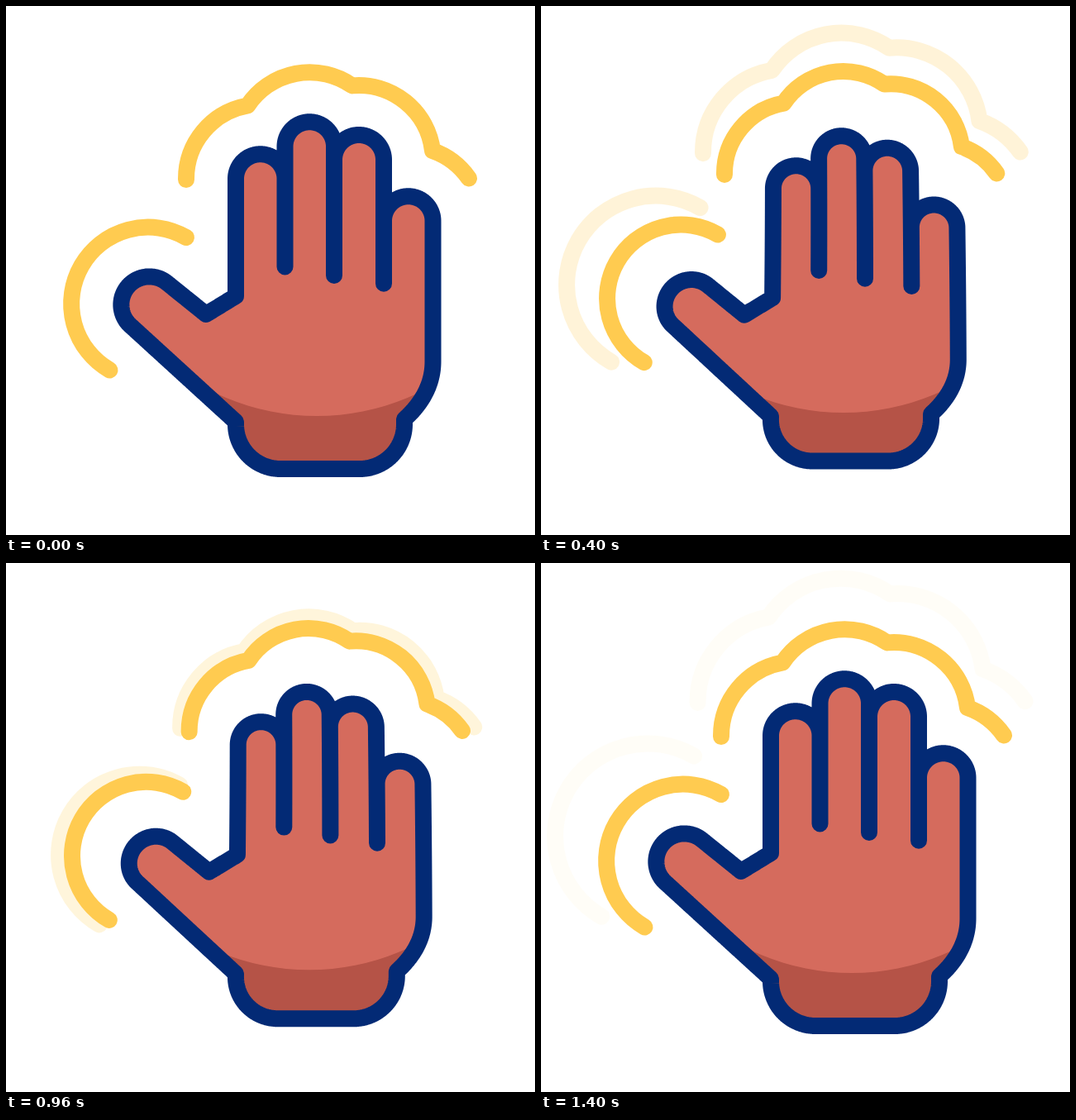
An HTML page for the animation above (1.48 s loop, 640 px wide and 640 px high).

```html
<!DOCTYPE html>
<html lang="en">
<head>
<meta charset="utf-8">
<title>Waving hand</title>
<style>
  html, body { margin: 0; width: 100%; height: 100%; overflow: hidden; background: #fff; }
  svg { display: block; width: 640px; height: 640px; }
  path { fill: none; stroke-width: 20; stroke-linecap: round; stroke-linejoin: round; }
  .halo { stroke: #ffcb50; vector-effect: non-scaling-stroke; }
  #skin { fill: #d56b5d; }
  #shade { fill: #b55347; }
  #outline { stroke: #032a75; }
</style>
</head>
<body>
<svg viewBox="0 0 640 640">
  <clipPath id="palm"><path class="hand"/></clipPath>
  <path class="halo" id="ghostTop"/>
  <path class="halo" id="ghostSide"/>
  <path class="halo" id="top"/>
  <path class="halo" id="side"/>
  <path class="hand" id="skin"/>
  <g clip-path="url(#palm)"><path id="shade" d="M91 211A285 285 0 0 0 661 211V640H91Z"/></g>
  <path class="hand" id="outline"/>
</svg>
<script>
const LOOP = 1480, STEP = 40, GHOST_END = 1320;
const PRESSES = [[80, 560], [760, 1400]];
const TOP_HALO = 'M218 210A90 90 0 0 1 292.3 120.5A90 90 0 0 1 418.8 96.4' +
  'A90 90 0 0 1 516 175A90 90 0 0 1 560 208.5';
const SIDE_HALO = 'M218 280A92.4 92.4 0 0 0 125.5 440.5';
const HAND = 'M278 351V209a29.75 29.75 0 0 1 59.5 0V316V170a29.75 29.75 0 0 1 59.5 0V326' +
  'V186a30 30 0 0 1 60 0V336V260a29.75 29.75 0 0 1 59.5 0V430C516.5 458 503 481 482 500' +
  'V506A54 54 0 0 1 428 560H332A54 54 0 0 1 278 506V503' +
  'L151.3 387.3A34 34 0 0 1 195.4 335.5L242 373Z';

const $ = id => document.getElementById(id);
const smooth = p => p * p * (3 - 2 * p);
const clamp = p => Math.min(1, Math.max(0, p));
const zoom = (id, s, x, y) =>
  $(id).setAttribute('transform', `translate(${x} ${y}) scale(${s}) translate(${-x} ${-y})`);

for (const id of ['top', 'ghostTop']) $(id).setAttribute('d', TOP_HALO);
for (const id of ['side', 'ghostSide']) $(id).setAttribute('d', SIDE_HALO);

const handParts = document.querySelectorAll('.hand');
$('outline').setAttribute('d', HAND);
const outlinePoints = Array.from({ length: Math.floor($('outline').getTotalLength()) },
  (_, i) => $('outline').getPointAtLength(i));

// Progress through the current press, and its rise and fall.
function phaseAt(t) {
  const [start, end] = PRESSES[t < 660 ? 0 : 1];
  return clamp((t - start) / (end - start));
}
const pressAt = phase => smooth(1 - Math.abs(2 * phase - 1));

// The hand leans back: fingers shorten and narrow more than the wrist.
function lean({ x, y }, k) {
  const drop = (y - 230) / 270, v = y - 350;
  const dx = -2 * drop * drop - (0.0687 - 0.0197 * drop) * (x - 320);
  const dy = 2.2 - 0.0631 * v + 0.000035 * v * v;
  return `${(x + k * dx).toFixed(2)} ${(y + k * dy).toFixed(2)}`;
}

function draw(t) {
  const k = 1.35 * pressAt(phaseAt(t));
  const d = 'M' + outlinePoints.map(p => lean(p, k)).join('L') + 'Z';
  handParts.forEach(part => part.setAttribute('d', d));
  $('shade').setAttribute('transform', `translate(${-10 * k} ${-4 * k})`);
  zoom('top', 1 - 0.037 * k, 325, 45);
  zoom('side', 1 - 0.036 * k, 105, 182);

  const phase = phaseAt(Math.min(t, GHOST_END)), spread = smooth(phase);
  zoom('ghostTop', 1 + 0.165 * spread, 398, 470);
  zoom('ghostSide', 1 + 0.22 * spread, 374, 501);
  for (const id of ['ghostTop', 'ghostSide'])
    $(id).setAttribute('stroke-opacity', 0.3 * pressAt(phase));
}

const began = performance.now();
function tick() {
  const t = (performance.now() - began) % LOOP;
  draw(Math.floor(t / STEP) * STEP);
  requestAnimationFrame(tick);
}
tick();
</script>
</body>
</html>
```
